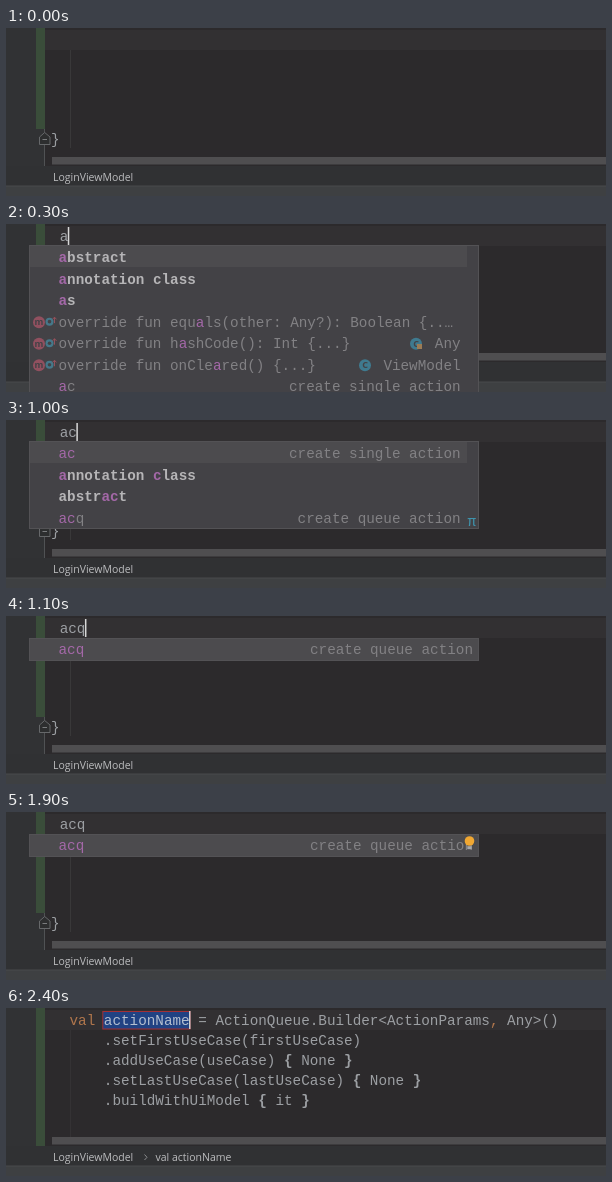
Recreate the animation shown at these times as an HTML page. Size 600 by 168 pixels, loop 2500 ms.

```html
<!DOCTYPE html>
<html lang="en">
<head>
<meta charset="utf-8">
<title>Live template completion</title>
<style>
html, body { margin: 0; width: 100%; height: 100%; overflow: hidden; background: #2c2a2c; }
svg { display: block; width: 600px; height: 168px; }
text { font: 14.3px "Liberation Mono", "Courier New", monospace; white-space: pre; fill: #9c9fa3; }
.ui { font: 10.5px "Open Sans", "Noto Sans", sans-serif; fill: #bcbdbf; }
.dim { fill: #828184; }
.key { font-weight: bold; fill: #b6b5b7; }
.hit { fill: #a468a8; }
.kw { fill: #b0764c; }
.b { font-weight: bold; }
.sel { fill: #b4bfd0; }
.icon { font: bold 9px "Open Sans", sans-serif; text-anchor: middle; fill: #434246; }
</style>
</head>
<body>
<svg id="stage" viewBox="0 0 600 168"></svg>
<script>
const LOOP = 2500;
const CELL = 14.3 * 0.6;
const ROW = 21.55;

// Each entry holds from its time until the next one.
const steps = [
  { at: 0, layers: 'plain' },
  { at: 200, layers: 'plain', typed: 'a', caret: true },
  { at: 300, layers: 'plain listA', typed: 'a', caret: true },
  { at: 700, layers: 'plain listAc', typed: 'ac', caret: true },
  { at: 1100, layers: 'plain listAcq', typed: 'acq', caret: true },
  { at: 1400, layers: 'plain listAcq bulb', typed: 'acq', caret: true },
  { at: 1600, layers: 'plain listAcq bulb', typed: 'acq' },
  { at: 2000, layers: 'expanded' }
];

const rect = (x, y, w, h, fill, extra = '') =>
  `<rect x="${x}" y="${y}" width="${w}" height="${h}" fill="${fill}" ${extra}/>`;
const circle = (x, y, r, fill) => `<circle cx="${x}" cy="${y}" r="${r}" fill="${fill}"/>`;
const path = (d, stroke, width = 1, fill = 'none') =>
  `<path d="${d}" stroke="${stroke}" stroke-width="${width}" fill="${fill}"/>`;
const escape = s => s.replace(/&/g, '&amp;').replace(/</g, '&lt;');
const label = (x, y, s, cls = '', extra = '') =>
  `<text x="${x}" y="${y}" class="${cls}" ${extra}>${s}</text>`;
const layer = (id, content) => `<g id="${id}">${content}</g>`;

// [x] marks matched letters, ~x~ bold code.
const rich = s => escape(s)
  .replace(/\[(\w+)\]/g, '<tspan class="hit">$1</tspan>')
  .replace(/~([^~]+)~/g, '<tspan class="b">$1</tspan>');

const baseline = row => 38 + row * ROW;

function item(row, name, cls, tail = '', right = 454.6) {
  const y = baseline(row);
  return label(52.5, y, rich(name), cls) +
    (tail && label(right, y, tail, 'dim', 'text-anchor="end"'));
}

function methodIcons(row) {
  const y = baseline(row) - 4.5;
  return circle(33, y, 6, '#91505f') + label(33, y + 3, 'm', 'icon') +
    circle(43.5, y - 0.5, 4, '#45788a') +
    circle(43.5, y - 0.5, 1.8, '#434246') +
    path(`M48.5 ${y + 1}V${y - 5}M46.5 ${y - 2.8}L48.5 ${y - 5}L50.5 ${y - 2.8}`, '#95505a');
}

const classIcon = (x, row) => {
  const y = baseline(row) - 4.5;
  return circle(x, y, 6, '#3f7a8f') + label(x, y + 3.2, 'C', 'icon');
};

const popup = (y, h, selectedWidth) =>
  rect(23.5, y + 0.5, 449, h - 1, '#434246', 'stroke="#535255"') +
  rect(24, y + 1, selectedWidth, 21, '#4c4b4e');

const base =
  rect(0, 0, 600, 168, '#2c2a2c') +
  rect(0, 0, 39, 138, '#313234') +
  rect(39, 2, 561, 20, '#323032') +
  rect(46, 129, 554, 7.5, '#4f4e50') +
  rect(0, 138, 600, 20, '#303133') +
  rect(0, 158, 600, 10, '#3e4042') +
  rect(0, 157.5, 600, 1, '#484a4c') +
  label(47, 153, 'LoginViewModel', 'ui');

const plain =
  rect(30, 0, 9, 101, '#3a4d3a') +
  rect(38, 101, 1, 37, '#505254') +
  rect(64, 22, 1, 98, '#393839') +
  path('M33.5 116.5V109L38.7 104.5L44 109V116.5Z', '#66686a', 1, '#2d2e2f') +
  path('M36.5 111.5H41', '#7a7c7e') +
  label(45, 116, '}');

const listA = popup(21, 160, 437) +
  item(0, '[a]bstract', 'key') +
  item(1, '[a]nnotation class', 'key') +
  item(2, '[a]s', 'key') +
  item(3, 'override fun equ[a]ls(other: Any?): Boolean {..…', 'dim') +
  item(4, 'override fun h[a]shCode(): Int {...}', 'dim', 'Any') +
  item(5, 'override fun onCle[a]red() {...}', 'dim', 'ViewModel') +
  item(6, '[a]c', 'dim', 'create single action') +
  [3, 4, 5].map(methodIcons).join('') +
  classIcon(410, 4) + rect(411, 120, 5, 5, '#9c7c55') +
  classIcon(359, 5);

const listAc = popup(21, 88, 437) +
  item(0, '[ac]', 'dim', 'create single action') +
  item(1, '[a]nnotation [c]lass', 'key') +
  item(2, 'abstr[ac]t', 'key') +
  item(3, '[ac]q', 'dim', 'create queue action') +
  label(461.5, 106, 'π', '', 'style="fill:#3f93ac"');

const listAcq = popup(22, 23, 448) +
  item(0, '[acq]', 'dim', 'create queue action', 467);

const bulb = circle(463.5, 29, 4.8, '#f0a732') + rect(461.3, 34.2, 4.4, 3, '#a8a9aa');

const chain = [
  '.setFirstUseCase(firstUseCase)',
  '.addUseCase(useCase) ~{~ None ~}~',
  '.setLastUseCase(lastUseCase) ~{~ None ~}~',
  '.buildWithUiModel ~{~ it ~}~'
];
const nameX = 63.5 + 4 * CELL;
const expanded =
  rect(30, 0, 9, 138, '#3a4d3a') +
  rect(64, 22, 1, 107, '#343234') +
  rect(nameX - 1, 3.5, 10 * CELL + 1.5, 17.5, '#214283', 'stroke="#a32f35"') +
  label(63.5, 17, '<tspan class="kw">val</tspan> <tspan class="sel">actionName</tspan>' +
    escape(' = ActionQueue.Builder<ActionParams') + '<tspan class="kw">,</tspan> Any>()') +
  chain.map((s, i) => label(nameX, 37.3 + i * 20, rich(s))).join('') +
  rect(183, 3, 1.5, 18, '#d0d0d0') +
  path('M138.5 146.5L141 149.3L138.5 152', '#8a8c8e') +
  label(149.5, 153, 'val actionName', 'ui');

const layers = { plain, listA, listAc, listAcq, bulb, expanded };

document.getElementById('stage').innerHTML = base +
  Object.entries(layers).map(([id, content]) => layer(id, content)).join('') +
  label(53.7, 17, '', '', 'id="typed"') +
  rect(0, 3, 1.5, 18, '#d8d8d8', 'id="caret"');

const groups = Object.keys(layers).map(id => document.getElementById(id));
const typed = document.getElementById('typed');
const caret = document.getElementById('caret');
let current;

function show(step) {
  if (step === current) return;
  current = step;
  const visible = step.layers.split(' ');
  for (const g of groups) g.style.display = visible.includes(g.id) ? '' : 'none';
  const text = step.typed || '';
  typed.textContent = text;
  caret.setAttribute('x', 53.7 + text.length * CELL - 0.5);
  caret.style.display = step.caret ? '' : 'none';
}

const start = performance.now();
function tick() {
  const t = Math.max(0, performance.now() - start) % LOOP;
  show(steps.findLast(s => s.at <= t));
  requestAnimationFrame(tick);
}
tick();
</script>
</body>
</html>
```
